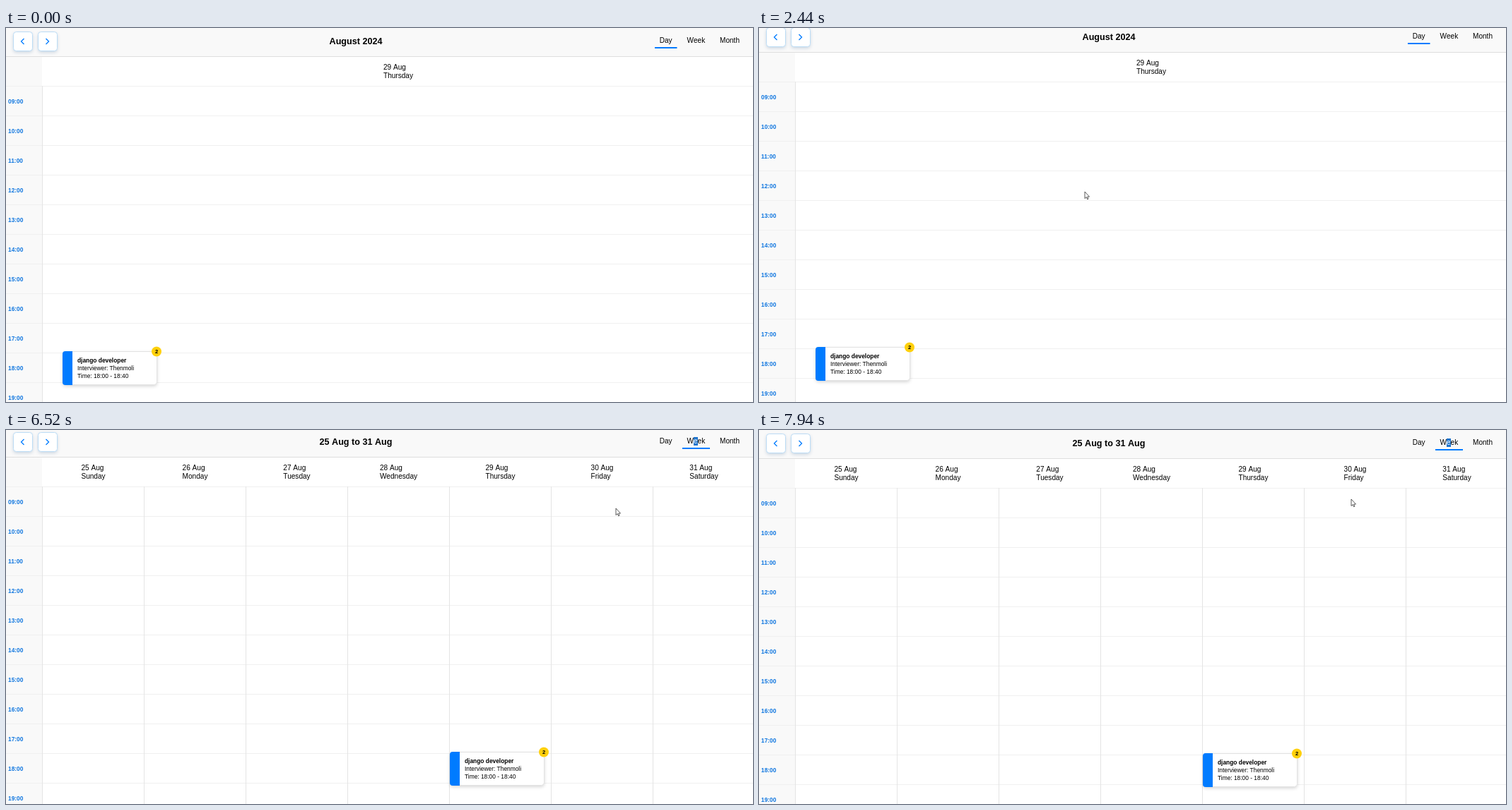
These frames come from a looping animation (1057 by 530 pixels, 8 s). An HTML page with a canvas:

```html
<!DOCTYPE html>
<html>
<head>
<meta charset="utf-8">
<title>Interview calendar</title>
<style>
html, body { margin: 0; overflow: hidden; background: #fff; }
canvas { display: block; }
</style>
</head>
<body>
<canvas id="stage" width="1057" height="530"></canvas>
<script>
const LOOP = 8000, STEP = 51.5, TICK = 84;
const WEEK_AT = 5670, SELECT_AT = 5410, CURSOR_AT = 450;
const ROW = 42, GRID_TOP = 82, GRID_LEFT = 51, COLUMN = 144;
const BLUE = '#007bff', PANEL = '#f9f9f9';
const DAYS = ['Sunday', 'Monday', 'Tuesday', 'Wednesday', 'Thursday', 'Friday', 'Saturday'];
const ctx = document.getElementById('stage').getContext('2d');

// Progress from 0 to 1, advancing once per STEP; the first advance is at start.
function progress(t, start, end = start) {
  const count = Math.round((end - start) / STEP) + 1;
  const done = Math.floor((t - start) / STEP + 1.2);
  return t < start ? 0 : Math.min(1, done / count);
}

const easeOut = (x, power) => 1 - (1 - x) ** power;

function scrollAt(t) {
  const down = progress(t, 1060, 1110) + easeOut(progress(t, 6520, 7240) ** 1.6, 1.7);
  const up = easeOut(progress(t, 1870, 2550), 1.37) + progress(t, 7590, 7640);
  const nudge = 10 * progress(t, 2850, 3000) - progress(t, 3260) - 9 * progress(t, 3560, 3610);
  return Math.round(TICK * (down - up) + nudge);
}

function pointerAt(t) {
  let x = 914, y = 495;
  const glide = (toX, toY, p) => {
    x += (toX - x) * p;
    y += (toY - y) * p;
  };
  glide(461, 232, progress(t, CURSOR_AT, 610));
  glide(969, 28, easeOut(progress(t, 3930, 4550), 4));
  glide(976, 23, progress(t, 4810));
  glide(971, 10, progress(t, 5060, 5260));
  glide(977, 13, progress(t, SELECT_AT));
  glide(863, 111, progress(t, 6120, 6270));
  glide(838, 98, progress(t, 7940));
  return [x, y];
}

function rect(x, y, w, h, color) {
  ctx.fillStyle = color;
  ctx.fillRect(x, y, w, h);
}

function setFont(size, bold) {
  ctx.font = `${bold ? 'bold ' : ''}${size}px "Liberation Sans", Arial, sans-serif`;
}

function text(str, x, y, size, { bold = false, color = '#000', align = 'left' } = {}) {
  setFont(size, bold);
  ctx.textAlign = align;
  ctx.fillStyle = color;
  ctx.fillText(str, x, y);
}

function box(x, y, w, h, border, shadow) {
  ctx.save();
  ctx.shadowColor = shadow;
  ctx.shadowBlur = 5;
  ctx.shadowOffsetY = 2;
  ctx.beginPath();
  ctx.roundRect(x + 0.5, y + 0.5, w - 1, h - 1, 4);
  ctx.fillStyle = '#fff';
  ctx.fill();
  ctx.restore();
  ctx.strokeStyle = border;
  ctx.lineWidth = 1;
  ctx.stroke();
}

function arrowButton(x, dir) {
  box(x, 5, 28, 28, '#bcdcf5', 'rgba(0,60,120,.2)');
  const middle = x + 13.5;
  ctx.beginPath();
  ctx.moveTo(middle - 2 * dir, 15);
  ctx.lineTo(middle + 2 * dir, 19);
  ctx.lineTo(middle - 2 * dir, 23);
  ctx.strokeStyle = BLUE;
  ctx.lineWidth = 1.3;
  ctx.stroke();
}

function header(week, hover, selected) {
  rect(0, 0, 1057, 40, PANEL);
  rect(0, 40, 1057, 1, '#dedede');
  arrowButton(10, -1);
  arrowButton(45, 1);
  text(week ? '25 Aug to 31 Aug' : 'August 2024', 495, 23, 12.6, { bold: true, align: 'center' });
  text('Day', 924.7, 21.3, 10.08);
  text('Week', 963.6, 21.3, 10.08, { color: hover ? '#0056b3' : '#000' });
  text('Month', 1010, 21.3, 10.08);
  if (selected) {
    rect(973, 12, 6, 12, '#1f74cc');
    text('e', 973.1, 21.3, 10.08, { color: '#fff' });
  }
  if (week) rect(957, 27, 39, 2, BLUE);
  else rect(918, 27, 31.5, 2, BLUE);
}

function dateLabel(index, center) {
  const lines = [`${25 + index} Aug`, DAYS[index]];
  setFont(10.08);
  const width = Math.max(...lines.map(line => ctx.measureText(line).width));
  lines.forEach((line, i) => text(line, center - width / 2, 59 + 12 * i, 10.08));
}

function grid(week) {
  rect(0, 41, GRID_LEFT, 700, PANEL);
  for (let i = 0; i < 14; i++) {
    const y = GRID_TOP + i * ROW;
    rect(0, y, 1057, 1, '#f0f0f0');
    text(`${i + 9}:00`.padStart(5, '0'), 3, y + 25, 8.4, { bold: true, color: '#1479e0' });
  }
  for (let i = 0; i < (week ? 7 : 1); i++) {
    rect(GRID_LEFT + i * COLUMN, GRID_TOP, 1, 700, '#e4e4e4');
    if (week) dateLabel(i, GRID_LEFT + COLUMN * (i + 0.5) + 0.5);
  }
  if (!week) dateLabel(4, 555);
}

function card(x, y, hours, badge) {
  box(x, y, 134, 48, '#e2e2e2', 'rgba(0,0,0,.18)');
  ctx.beginPath();
  ctx.roundRect(x, y, 14, 48, [4, 0, 0, 4]);
  ctx.fillStyle = BLUE;
  ctx.fill();
  text('django developer', x + 21, y + 16, 8.4, { bold: true });
  text('Interviewer: Thenmoli', x + 21, y + 27.2, 8.4);
  text('Time: ' + hours, x + 21, y + 38.4, 8.4);
  if (!badge) return;
  ctx.beginPath();
  ctx.arc(x + 133, y + 0.5, 7, 0, 7);
  ctx.fillStyle = '#ffd00c';
  ctx.fill();
  text(badge, x + 133, y + 3.2, 7.6, { bold: true, align: 'center' });
}

const ARROW = new Path2D('M0 0V9.6L2.2 7.6L3.6 10.8L5 10.2L3.7 7.1H6.5Z');
const HAND = new Path2D('M-1 1Q0-.6 1 1V5Q2.2 4.2 3 5.3Q4.2 4.7 4.8 5.8Q6.2 5.4 6.3 7V9.5L5.2 13H-.3L-3 8.6Q-3.2 6.8-1 8.3Z');

function cursor(x, y, shape) {
  ctx.save();
  ctx.translate(x, y);
  ctx.fillStyle = '#fff';
  ctx.strokeStyle = '#333';
  ctx.lineWidth = 0.8;
  ctx.fill(shape);
  ctx.stroke(shape);
  ctx.restore();
}

function draw(t) {
  const [x, y] = pointerAt(t);
  const week = t >= WEEK_AT;
  const hover = x > 957 && x < 996 && y < 30;
  const cardX = week ? 628 : 80;

  rect(0, 0, 1057, 530, '#fff');
  ctx.save();
  ctx.translate(0, -scrollAt(t));
  grid(week);
  header(week, hover, t >= SELECT_AT);
  card(cardX, 458, '18:00 - 18:40', '2');
  card(cardX, 458 + 2 * ROW, '20:00 - 21:00');
  ctx.restore();
  if (t >= CURSOR_AT) cursor(x, y, hover ? HAND : ARROW);
}

const started = performance.now();
function frame() {
  draw((performance.now() - started) % LOOP);
  requestAnimationFrame(frame);
}
frame();
</script>
</body>
</html>
```
